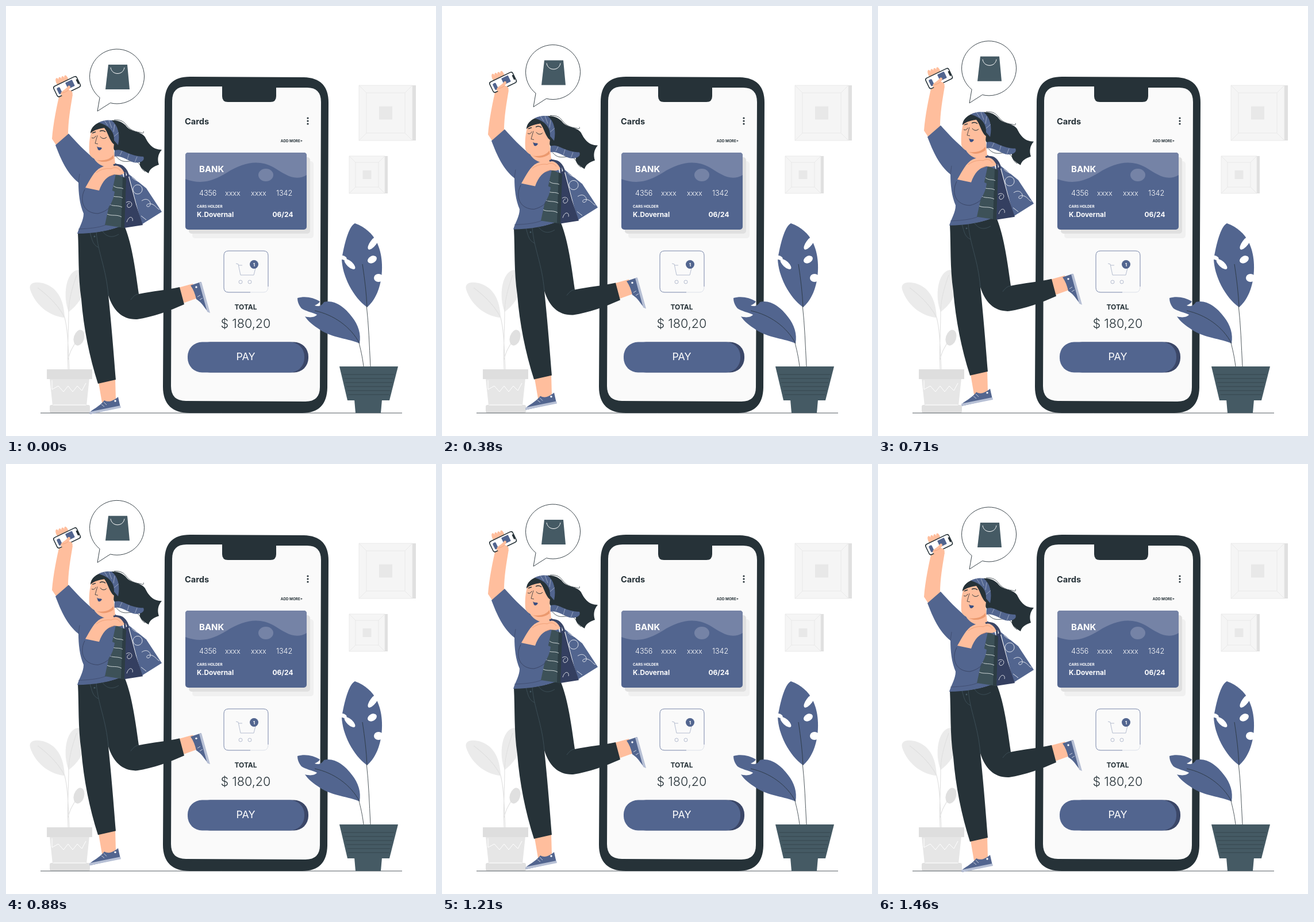
An HTML page with a canvas for the animation above (1500 ms loop, 748 px wide and 748 px high).

```html
<!DOCTYPE html>
<html lang="en">
<head>
<meta charset="utf-8">
<title>Mobile payment</title>
<style>
html, body { margin: 0; width: 100%; height: 100%; overflow: hidden; background: #fff; }
canvas { display: block; width: 748px; height: 748px; }
</style>
</head>
<body>
<canvas id="stage" width="748" height="748"></canvas>
<script>
const ctx = document.getElementById('stage').getContext('2d');
const LOOP = 1500, STEP = 1000 / 24, RISE = 14.96;
const INK = '#263238', BLUE = '#52658f', NAVY = '#3b4768', SLATE = '#455a64';
const SKIN = '#ffbe9d', SHADE = '#eb996e', WHITE = '#fff', PALE = '#b7c0d5';
const GREY1 = '#f5f5f5', GREY2 = '#ebebeb', GREY3 = '#e0e0e0';

function fill(d, color) {
  ctx.fillStyle = color;
  ctx.fill(new Path2D(d));
}
function line(d, color = INK, width = 0.8) {
  ctx.strokeStyle = color;
  ctx.lineWidth = width;
  ctx.stroke(new Path2D(d));
}
function rect(x, y, w, h, color, r = 0) {
  ctx.fillStyle = color;
  ctx.beginPath();
  ctx.roundRect(x, y, w, h, r);
  ctx.fill();
}
function oval(x, y, rx, ry, color, angle = 0) {
  ctx.fillStyle = color;
  ctx.beginPath();
  ctx.ellipse(x, y, rx, ry, angle, 0, Math.PI * 2);
  ctx.fill();
}
function text(str, x, y, size, weight, color = INK, align = 'left') {
  ctx.font = `${weight} ${size}px Inter, sans-serif`;
  ctx.textAlign = align;
  ctx.fillStyle = color;
  ctx.fillText(str, x, y);
}

function wallFrame(x, y, w, h, side, inset, core) {
  rect(x, y, w + side, h, GREY3);
  rect(x, y, w, h, GREY1);
  const r = x + w, b = y + h, i = inset;
  line(`M${x} ${y}H${r}V${b}H${x}ZL${x + i} ${y + i}H${r - i}V${b - i}H${x + i}V${y + i}
    M${r} ${y}l${-i} ${i}M${x} ${b}l${i} ${-i}M${r} ${b}l${-i} ${-i}`, '#e6e6e6', 0.8);
  rect(x + (w - core) / 2, y + (h - core) / 2, core, core, '#e8e8e8');
}

function greyPlant() {
  fill('M102 542C82 541 52 525 42 493C38 478 60 478 76 487C95 498 101 520 102 542Z', GREY2);
  fill('M109 532C98 505 104 462 125 459C146 465 141 510 109 532Z', GREY2);
  oval(127, 577, 9, 14, GREY3, 0.3);
  line('M55 490C75 505 92 522 102 542C108 565 108 595 110 632M123 468C115 490 109 515 109 532C109 570 106 600 108 632M108 615C111 600 116 594 127 575', GREY3, 1.1);
  rect(76, 694, 70, 14, GREY3, 3);
  fill('M76 648H145L140 695H81Z', '#e6e6e6');
  rect(71, 632, 79, 17, '#dedede');
  line('M80 651V667L91 661L100 671L108 661L116 671L124 661L132 669L139 656', WHITE, 1);
  line('M82 694H139', WHITE, 1);
}

function bluePlant() {
  line('M634 627C632 590 631 555 627 520M622 627C620 610 617 598 613 582');
  fill('M607 378C598 382 590 405 584 440C585 470 604 507 628 524C645 510 655 482 654 450C653 425 645 392 607 378Z', BLUE);
  oval(639, 412, 5.5, 14, WHITE, 0.65);
  oval(637, 441, 8.5, 6, WHITE, -0.5);
  oval(648, 473, 8, 7, WHITE);
  oval(598, 449, 12, 5, WHITE, 0.75);
  oval(587, 438, 6, 3.5, WHITE, 0.4);
  line('M620 449C624 475 627 500 628 524');
  fill('M615 587C598 579 566 577 546 563C535 556 526 549 520 540C530 543 538 541 541 537C533 533 521 531 514 526C509 520 507 514 507 508C520 504 535 507 546 514C544 518 540 519 537 521C545 524 550 520 553 515C570 510 589 523 602 541C613 555 618 571 615 587Z', BLUE);
  line('M537 530C570 537 600 558 615 587');
  fill('M606 685H654L652 708H608Z', SLATE);
  fill('M580 627H682L667 686H594Z', SLATE);
  for (let y = 641; y < 678; y += 7) {
    const inset = (y - 627) / 4 + 3;
    line(`M${580 + inset} ${y}H${682 - inset}`, '#2e3e46', 0.7);
  }
}

function bankCard() {
  rect(324, 270, 211, 134, '#f0f0f0', 5);
  rect(318, 263, 211, 133, GREY3, 5);
  rect(312, 255, 211, 134, BLUE, 5);
  fill('M312 301C342 312 362 303 384 290C412 272 440 266 466 281C486 293 502 306 523 294V260Q523 255 518 255H317Q312 255 312 260Z', '#7583a6');
  oval(452, 294, 13, 11, '#7583a6');
  text('BANK', 336, 289, 15, 700, WHITE);
  ['4356', 'xxxx', 'xxxx', '1342'].forEach((part, i) =>
    text(part, [336, 381, 426, 470][i], 330, 12.6, 300, WHITE));
  text('CARS HOLDER', 332, 351, 6.3, 700, WHITE);
  text('K.Dovernal', 332, 367, 11.8, 700, WHITE);
  text('06/24', 499.5, 367, 12, 700, WHITE, 'right');
}

function cart() {
  line('M456 488V434Q456 426 448 426H387Q379 426 379 434V490Q379 498 387 498H425', '#7886a9', 1);
  line('M425 498H448Q456 498 456 488', '#d5dae5', 0.8);
  line('M400 448L404 449L408 468H431L434 456M405 451H411', '#a4aec4', 0.8);
  line('M405 480a3 3 0 1 0 6 0a3 3 0 1 0 -6 0M421 480a3 3 0 1 0 6 0a3 3 0 1 0 -6 0', '#a4aec4', 0.8);
  oval(431.5, 449.5, 7.5, 7.5, BLUE);
  text('1', 431.5, 452.5, 8, 700, WHITE, 'center');
}

function bigPhone() {
  fill('M276 167Q276 123 320 123L518 124Q561 125 561 168L559 664Q558 708 515 708H320Q273 708 273 662Z', INK);
  fill('M289 165Q289 140 314 140H376V157Q376 167 386 167H460Q470 167 470 157V142H524Q548 142 548 167L546 663Q546 688 521 688L313 687Q287 687 287 661Z', '#fafafa');
  text('Cards', 311, 206, 14.6, 700);
  for (const y of [195, 200, 205]) oval(525, y, 1.6, 1.6, INK);
  text('ADD MORE+', 516, 236.5, 6.3, 700, INK, 'right');
  bankCard();
  cart();
  text('TOTAL', 417, 528, 12, 700, INK, 'center');
  text('$ 180,20', 417, 560, 21.6, 300, INK, 'center');
  rect(330, 584.5, 196, 53, NAVY, 25);
  rect(316, 584.5, 203, 53, BLUE, 25);
  text('PAY', 417, 616, 17.8, 400, WHITE, 'center');
}

function bubble() {
  const d = 'M163.1 159.4L159 183L181.5 168.6A47.5 47.5 0 1 0 163.1 159.4Z';
  fill(d, WHITE);
  line(d, INK, 0.9);
  fill('M178 102H211L215 145H173Z', SLATE);
  line('M182 107C184 121 204 121 206 107', WHITE, 1);
}

function legs() {
  fill('M161 655L190 648L191 684L176 692L167 690Z', SKIN);
  fill('M171 686C180 691 189 685 195 680L199 698L146 710C143 704 160 700 171 686Z', BLUE);
  fill('M145 706L199 695L200 699L146 710Z', PALE);
  oval(190, 687, 1.7, 1.7, WHITE);
  line('M166 693L171 697M170 689L175 694', WHITE, 0.7);

  fill('M300 490L325 483L333 508L308 517Z', SKIN);
  fill('M321 486L339 480L354 533C347 530 344 518 331 510C329 501 326 493 321 486Z', BLUE);
  fill('M336 481L340 480L355 534L350 532Z', PALE);
  oval(331, 489, 1.7, 1.7, WHITE);
  line('M333 506L338 503M337 511L342 508', WHITE, 0.7);

  fill('M125 394C150 396 185 390 205 380C218 410 224 450 231 501C255 496 280 494 302 489L310 519C285 530 255 541 228 545C203 546 186 530 178 503C184 560 187 600 191 650L160 657C145 610 135 560 131 510C125 470 127 430 125 394Z', INK);
  line('M146 394C150 406 150 415 161 420M157 393C160 430 174 455 178 503M230 501C224 502 220 507 217 511M168 392C175 402 185 404 196 397', SLATE, 0.7);
  oval(154, 401, 1.4, 1.4, SLATE);
}

function raisedArm() {
  fill('M94 150C88 175 82 205 80 231L88 243L108 225C108 200 112 178 116 154Z', SKIN);
  for (let i = 0; i < 4; i++) oval(90 + i * 5, 132 - i * 1.6, 3.1, 7, SKIN, -0.35);
  ctx.save();
  ctx.translate(106, 140);
  ctx.rotate(-0.45);
  rect(-23, -10.5, 46, 21.5, INK, 4);
  rect(-21.5, -9, 43, 18.5, WHITE, 3);
  rect(19, -4, 3, 9, INK, 1);
  rect(0, -7, 13, 12, BLUE, 1);
  rect(-18, -5, 6, 12, BLUE, 2);
  ctx.restore();
  fill('M95 154C95 147 103 147 108 139C113 137 113 143 109 146C115 147 118 151 114 157L105 162Z', SKIN);
  line('M98 151C104 150 106 148 109 146', SHADE, 0.7);
}

function hairBack() {
  fill('M147 221C148 208 160 203 172 202C185 195 203 200 210 210C219 220 234 217 242 228C247 238 254 250 271 250C264 258 263 267 266 276C257 279 250 283 248 291C238 285 231 279 233 272C223 266 208 260 192 256L178 235Z', INK);
  line('M188 198C215 197 203 216 234 220C239 222 240 221 239 218M192 262C205 278 217 265 229 272C235 276 234 284 242 288');
  fill('M189 251C204 247 211 261 239 262C243 270 231 274 222 272C210 268 200 259 188 262Z', BLUE);
  line('M202 252L198 260M214 257L211 267M228 262L224 272', PALE, 0.7);
}

function head() {
  fill('M158 262L187 244L190 275C182 284 164 281 154 267Z', SKIN);
  fill('M158 268C173 270 181 266 187 259L187 265C178 272 167 273 158 268Z', SHADE);
  fill('M150 214C145 227 144 242 145 256C148 267 161 269 172 266C184 263 188 250 188 236L180 210Z', SKIN);
  fill('M147 221C149 209 157 204 166 201C180 200 193 216 194 242L187 240C180 234 178 221 171 212C164 213 154 215 147 221Z', INK);
  fill('M161 203C170 198 178 198 184 199C195 208 199 224 195 242L188 234C189 218 178 207 161 203Z', BLUE);
  line('M171 199L177 208M179 199L184 212M189 206L187 219M196 220L188 227', PALE, 0.7);
  line('M149 229C152 231 155 229 156 226M164 227C167 232 173 231 175 228', INK, 1);
  line('M150 221L156 219M163 218C167 216 171 217 173 219', INK, 1.4);
  line('M159 225L155 239L160 240', INK, 0.8);
  fill('M158 244C161 247 164 245 167 247C165 251 162 252 160 250Z', '#3b4f82');
}

function bags() {
  line('M189 278C201 274 210 283 213 297M199 278C209 286 207 295 207 305', NAVY, 3.5);
  fill('M213 292L244 317L271 358L236 380Z', BLUE);
  fill('M212 293L226 345L238 381L206 386L204 300Z', '#343f60');
  line('M221 318a8 8 0 1 1 16 2a8 8 0 1 1 -16 -2M219 298C224 304 228 303 230 306M236 339C248 330 256 346 248 349C242 350 244 341 255 345C261 348 262 352 267 354M235 365L244 372M209 342C216 337 222 344 217 349C211 354 208 345 215 343M210 376C214 363 222 367 220 374', WHITE, 0.8);
  fill('M191 292L208 300L206 386L172 381Z', '#3d5158');
  fill('M203 297L209 300L206 386L200 385Z', '#2d3d44');
  line('M187 313C193 318 199 315 204 318M183 329C190 334 196 330 203 334M180 345C187 349 194 346 202 350M176 362C184 366 193 362 201 367', '#dce2e4', 0.9);
}

function torso() {
  fill('M86 242L109 222C122 236 137 253 154 266C164 281 181 281 190 273C202 282 207 300 207 322L205 381C182 391 151 396 124 396C128 383 135 373 135 361C128 345 126 325 126 307C106 291 96 268 86 242Z', BLUE);
  line('M126 307L128 292M126 388C150 387 167 385 179 378', NAVY, 0.7);
}

function bentArm() {
  fill('M137 319C126 341 137 361 160 361C177 357 186 343 189 323L163 310Z', BLUE);
  line('M137 319C126 341 137 361 160 361C172 358 179 353 184 345', NAVY, 1);
  fill('M138 316C147 301 153 287 165 281C176 276 193 273 201 281L206 290C202 295 194 294 188 293C176 296 168 304 162 321Z', SKIN);
  line('M157 290C166 283 176 282 183 283M183 283C190 279 196 282 199 287M188 293L180 296', SHADE, 0.8);
  line('M187 277C194 274 202 279 207 289', NAVY, 3);
}

function woman() {
  legs();
  raisedArm();
  torso();
  hairBack();
  head();
  bags();
  bentArm();
}

// Linear float, up for half the loop and down again, at 24 poses per second.
function liftAt(time) {
  const pose = Math.floor(((time + 4) % LOOP) / STEP);
  const phase = (pose + 0.5) * STEP / LOOP;
  return RISE * (1 - Math.abs(1 - 2 * phase));
}

function draw(time) {
  ctx.fillStyle = WHITE;
  ctx.fillRect(0, 0, 748, 748);
  wallFrame(614, 138, 93, 96, 6, 13, 23);
  wallFrame(597, 261, 62, 65, 5, 11, 15);
  greyPlant();
  line('M60 708H689', INK, 0.8);
  bigPhone();
  bluePlant();
  ctx.save();
  ctx.translate(0, 0.4 - liftAt(time));
  bubble();
  woman();
  ctx.restore();
}

let start;
function tick(now) {
  start ??= now;
  draw(now - start);
  requestAnimationFrame(tick);
}
draw(0);
requestAnimationFrame(tick);
</script>
</body>
</html>
```
